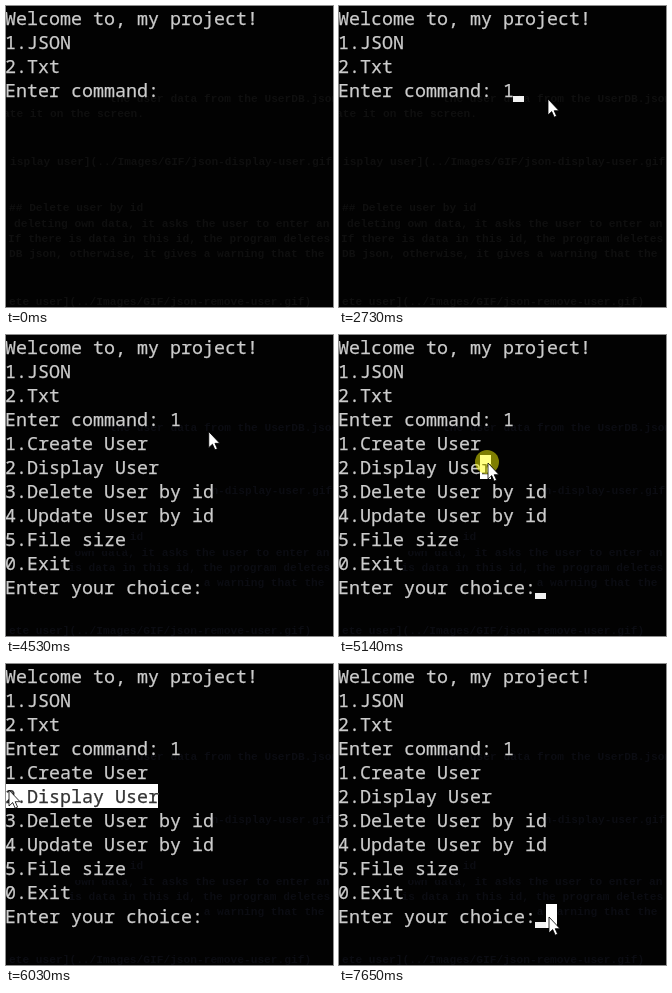
Write an HTML page that moves like this. It is 327x301 px and loops after 8000 ms.

```html
<!DOCTYPE html>
<html lang="en">
<head>
<meta charset="utf-8">
<title>Console menu</title>
<style>
html, body { margin: 0; width: 100%; height: 100%; overflow: hidden; background: #020202; }
svg { display: block; width: 327px; height: 301px; }
text { white-space: pre; }
.line { font: 18.333px "Noto Sans Mono", "DejaVu Sans Mono", monospace; fill: #ccc; stroke: #ccc; stroke-width: .25; }
.line.dark { fill: #333; stroke: #333; }
.ghost { font: bold 11.2px "Liberation Mono", monospace; }
</style>
</head>
<body>
<svg id="stage" viewBox="0 0 327 301">
  <rect width="327" height="301" fill="#020202"/>
  <g id="ghosts"></g>
  <g id="intro"></g>
  <g id="menu"></g>
  <text id="typed" class="line">1</text>
  <rect id="caret" width="11" height="6" fill="#f2f2f2"/>
  <rect id="mark" height="24" fill="#fff"/>
  <text id="marked" class="line dark"></text>
  <circle id="halo" r="12" fill="#ff0" fill-opacity=".49"/>
  <path id="arrow" d="M0 0V16L3.7 12.6L6.2 18.2L8.6 17.1L6.2 11.7H11Z" fill="#fff" stroke="#000" stroke-width=".8"/>
</svg>
<script>
const LOOP = 8000, CELL = 11, ROW = 24, LEFT = -2;
const $ = id => document.getElementById(id);
const colX = c => LEFT + c * CELL;
const textX = c => colX(c) + 1;
const baseY = r => r * ROW + 19;

function add(parent, tag, attrs, content = "") {
  const el = document.createElementNS("http://www.w3.org/2000/svg", tag);
  set(el, attrs);
  el.textContent = content;
  parent.appendChild(el);
}
function set(el, attrs) {
  for (const k in attrs) el.setAttribute(k, attrs[k]);
}
function show(el, on) {
  el.style.display = on ? "" : "none";
}

const intro = ["Welcome to, my project!", "1.JSON", "2.Txt", "Enter command:"];
const menu = ["1.Create User", "2.Display User", "3.Delete User by id",
  "4.Update User by id", "5.File size", "0.Exit", "Enter your choice:"];
const picked = menu[1];

// Dim page showing through the window: x, baseline, text
const ghosts = [
  [104, 96, "the user data from the UserDB.json"],
  [-3, 111, "ate it on the screen."],
  [4, 159, "isplay user](../Images/GIF/json-display-user.gif"],
  [3, 205, "## Delete user by id"],
  [8, 221, "deleting own data, it asks the user to enter an"],
  [2, 236, "If there is data in this id, the program deletes"],
  [3, 251, "DB json, otherwise, it gives a warning that the"],
  [3, 299, "ete user](../Images/GIF/json-remove-user.gif)"]
];
for (const [x, y, s] of ghosts) add($("ghosts"), "text", { x, y, class: "ghost" }, s);

intro.forEach((s, r) => add($("intro"), "text", { x: textX(0), y: baseY(r), class: "line" }, s));
menu.forEach((s, i) => {
  const r = i + 4;
  add($("menu"), "rect", { x: 0, y: r * ROW, width: colX(s.length), height: ROW, fill: "#020202" });
  add($("menu"), "text", { x: textX(0), y: baseY(r), class: "line" }, s);
});
set($("typed"), { x: textX(15), y: baseY(3) });

const easeOut = u => 1 - (1 - u) ** 2;
const smooth = u => u * u * (3 - 2 * u);

// Pointer moves: begin, last step, steps, from, to, easing
const moves = [
  [330, 880, 9, [309, 318], [209, 93], easeOut],
  [4390, 5140, 10, [209, 93], [149, 128], smooth],
  [5210, 5970, 12, [149, 128], [3, 126], easeOut],
  [6230, 7000, 12, [3, 126], [210, 253], smooth]
];
function pointerAt(t) {
  let p = moves[0][3];
  for (const [a, b, n, from, to, ease] of moves) {
    if (t < a) break;
    const step = Math.floor((t - a) / ((b - a) / (n - 1)) + 1e-6) + 1;
    const k = ease(Math.min(1, step / n));
    p = from.map((v, i) => v + (to[i] - v) * k);
  }
  return p;
}

// Caret: on, off, column, row
const blinks = [
  [1740, 2270, 15, 3], [2730, 2800, 16, 3], [3310, 3510, 16, 3],
  [3510, 4390, 18, 10], [4900, 6030, 18, 10], [7650, LOOP, 18, 10]
];
const presses = [[1210, 1340], [5060, 6030], [7130, 7390]];
const during = t => ([a, b]) => t >= a && t < b;

function select(t, x) {
  let from = 0, to = 0, row = 5;
  if (t >= 5140 && t < 7130) {
    to = picked.length;
    if (t < 6030) from = Math.max(0, Math.min(to - 1, Math.round((x - 1 - LEFT) / CELL)));
  } else if (t >= 7200) {
    [from, to, row] = [19, 20, 10];
  }
  set($("mark"), { x: colX(from), y: row * ROW, width: (to - from) * CELL });
  set($("marked"), { x: textX(from), y: baseY(row) });
  $("marked").textContent = row === 5 ? picked.slice(from, to) : "";
}

function draw(t) {
  const [x, y] = pointerAt(t);
  set($("arrow"), { transform: `translate(${x} ${y})` });
  set($("halo"), { cx: x - 1, cy: y - 1 });
  show($("halo"), presses.some(during(t)));

  const blink = blinks.find(during(t));
  show($("caret"), blink);
  if (blink) set($("caret"), { x: colX(blink[2]), y: blink[3] * ROW + 18 });

  show($("typed"), t >= 2730);
  show($("menu"), t >= 3510);
  set($("ghosts"), { fill: t < 3510 ? "#0f0f0f" : "#0b0c12" });
  select(t, x);
}

const start = performance.now();
function tick() {
  draw((performance.now() - start) % LOOP);
  requestAnimationFrame(tick);
}
tick();
</script>
</body>
</html>
```
